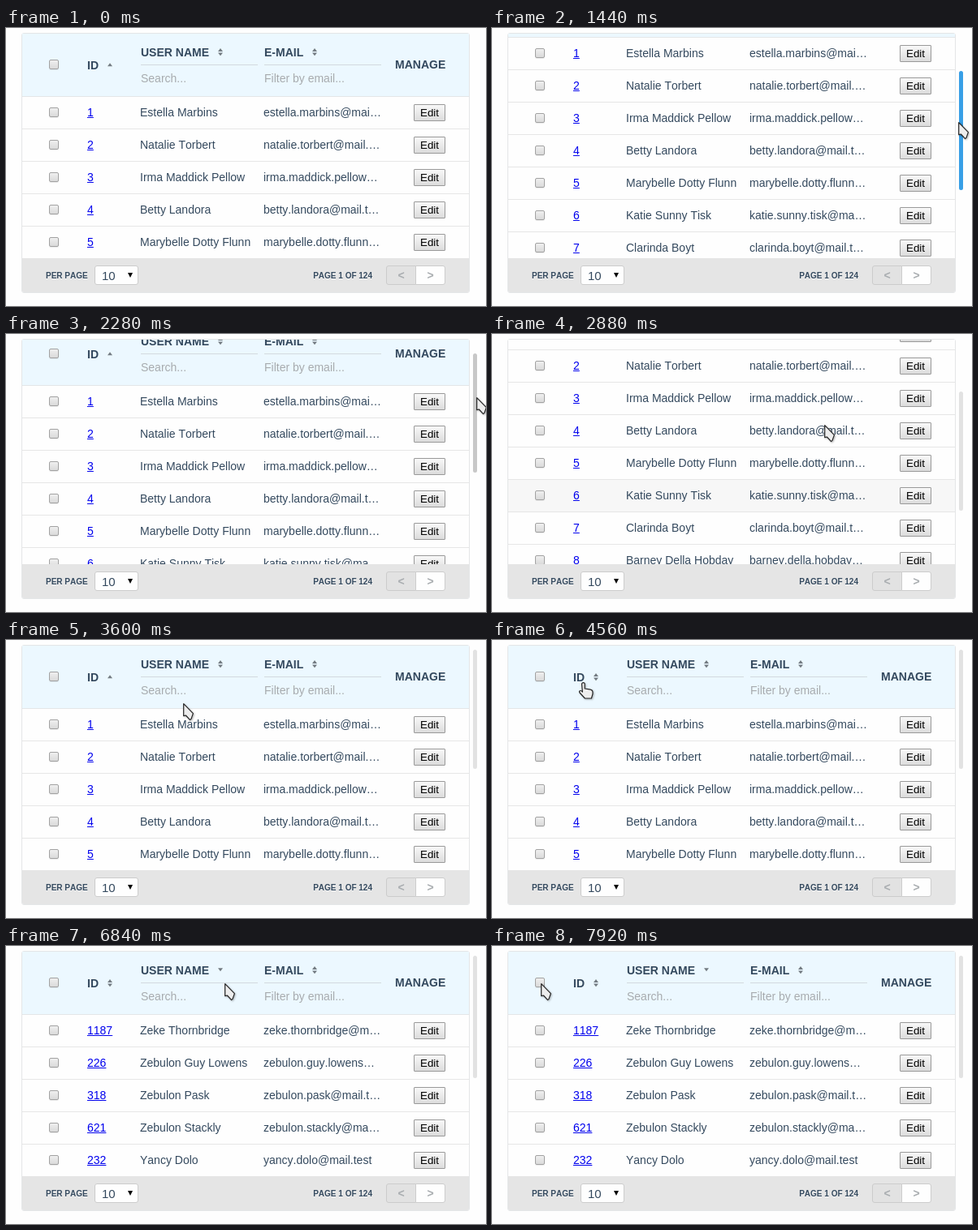
These frames come from a looping animation (591x343 px, 8000 ms). An HTML page:

```html
<!DOCTYPE html>
<html lang="en">
<head>
<meta charset="utf-8">
<title>User table</title>
<style>
  html, body { margin: 0; width: 100%; height: 100%; overflow: hidden; }
  body { position: relative; background: #fefefe; color: #34495e; white-space: nowrap;
    font: 14px/16px "Liberation Sans", Arial, sans-serif; font-kerning: none; }
  body * { position: absolute; box-sizing: border-box; }
  .frame { left: 19px; top: 6px; width: 552px; height: 321px; border: 1px solid #e4e6e7; border-radius: 3px; }
  .view { left: 20px; top: 7px; width: 550px; height: 277px; overflow: hidden; background: #fefefe; }
  .sheet { left: -20px; top: -7px; width: 591px; height: 485px; }
  .head { left: 20px; top: 7px; width: 550px; height: 78px; background: #ecf8ff; border-bottom: 1px solid #e3e6e8; }
  .line { top: 45px; width: 144px; height: 1px; background: #d3dade; }
  .hint { top: 54px; color: #a7abae; }
  .check { left: 53px; width: 12px; height: 12px; border: 1px solid #a2a2a2; border-radius: 2px;
    background: linear-gradient(#efefef, #dadada); box-shadow: 0 1px 1px rgba(0,0,0,.08); }
  .row { left: 20px; width: 550px; height: 40px; line-height: 39px; border-bottom: 1px solid #e6e6e6; }
  .row.on { background: #f7f7f7; }
  .row .check { left: 33px; top: 13px; }
  .id { left: 80px; color: #00e; text-decoration: underline; }
  .name { left: 145px; }
  .mail { left: 297px; width: 145px; overflow: hidden; text-overflow: ellipsis; }
  .edit { left: 482px; top: 9px; width: 39px; height: 21px; border: 1px solid #999; border-radius: 1px;
    background: linear-gradient(#f8f8f8, #dcdcdc); color: #000; font-size: 13.33px; line-height: 19px; text-align: center; }
  .foot { left: 20px; top: 284px; width: 550px; height: 42px; background: #e5e5e5; border-radius: 0 0 2px 2px; }
  .small { top: 298px; font-size: 10px; text-shadow: 0 1px 0 #f8f8f8; }
  .box { top: 293px; height: 24px; border: 1px solid #ccc; background: #fefefe; line-height: 22px; }
  .select { left: 109px; width: 54px; border-radius: 3px; padding-left: 8px; font-size: 15px; line-height: 23px; }
  .page { width: 37px; color: #a9adb0; font-weight: bold; text-align: center; }
  svg { overflow: visible; }
  .sort { width: 6px; height: 9px; fill: #737b82; }
  .bar { left: 575px; width: 5px; border-radius: 2.5px; }
  .cursor { left: 0; top: 0; width: 20px; height: 24px; filter: drop-shadow(1px 1px 1px rgba(0,0,0,.3)); }
  .cursor path { fill: #ededed; stroke: #222; stroke-width: 1.2; stroke-linejoin: round; }
</style>
</head>
<body>
<div class="frame"></div>
<div class="view"><div class="sheet" id="sheet">
  <div class="head"></div>
  <i class="check" style="top:39px"></i>
  <b style="left:100px;top:38px">ID</b>
  <svg class="sort" style="left:125px;top:41px"><path id="sortId"/></svg>
  <b style="left:166px;top:22px">USER NAME</b>
  <svg class="sort" style="left:261px;top:25px"><path id="sortName"/></svg>
  <b style="left:318px;top:22px">E-MAIL</b>
  <svg class="sort" style="left:377px;top:25px"><path id="sortMail"/></svg>
  <b style="left:479px;top:37px">MANAGE</b>
  <i class="line" style="left:166px"></i><i class="line" style="left:318px"></i>
  <span class="hint" style="left:166px">Search...</span>
  <span class="hint" style="left:318px">Filter by email...</span>
</div></div>
<div class="foot"></div>
<b class="small" style="left:49px">PER PAGE</b>
<div class="box select">10</div>
<svg style="left:150px;top:302px" width="6" height="6"><path d="M0 0h6L3 6z"/></svg>
<b class="small" style="right:140px">PAGE 1 OF 124</b>
<div class="box page" style="left:468px;background:#e2e2e2;border-radius:3px 0 0 3px">&lt;</div>
<div class="box page" style="left:504px;border-radius:0 3px 3px 0">&gt;</div>
<div class="bar" id="bar"></div>
<svg class="cursor" id="cursor"><path id="shape"/></svg>
<script>
  const LOOP = 8000, STEP = 120, RATIO = 1.78, ROW = 40, TOP = 85;
  const SHOW = 240, GRAB = 1080, DRAG = 1440, DROP = 2280;
  const $ = id => document.getElementById(id);

  const users = [
    [1, "Estella Marbins"], [2, "Natalie Torbert"], [3, "Irma Maddick Pellow"], [4, "Betty Landora"],
    [5, "Marybelle Dotty Flunn"], [6, "Katie Sunny Tisk"], [7, "Clarinda Boyt"],
    [8, "Barney Della Hobday"], [9, "Muriel Stanby"], [10, "Lorna Petwick"]
  ];
  const byId = [[1234, "Lorraine Vey"], [1233, "Philomena Dawley"], [1232, "Florinda Cobhan"],
    [1231, "Piper Grace Holt"], [1230, "Rinaldo Ivo Tasker"]];
  const byName = [[1187, "Zeke Thornbridge"], [226, "Zebulon Guy Lowens"], [318, "Zebulon Pask"],
    [621, "Zebulon Stackly"], [232, "Yancy Dolo"]];

  const both = "M0 4L3 0 6 4zM0 5.5h6L3 9.3z", asc = "M0 6.3L3 2.3 6 6.3z", desc = "M0 2.3h6L3 6.3z";
  const arrow = "M.7.7V15.6L3.4 15 8.6 20.6 10 19.4 12.4 12.6z";
  const hand = "M3.6 2.6Q3.6.7 5.4.7T7.2 2.6V8l5.6.8q4.2.6 4.2 3.4v2.4L15.4 20H7.4L1 13Q-.1 11.4 1.3 10.7T4.4 12z";

  const states = [
    { from: 0, list: users, id: asc, name: both },
    { from: 4560, list: users, id: both, name: both },
    { from: 5280, list: byId, id: desc, name: both },
    { from: 6240, list: byName, id: both, name: desc }
  ];

  // Key points: time, then values
  const scroll = [[1320, 0], [1440, 73], [1680, 201], [2280, 21], [2400, 21], [2640, 201], [2760, 201],
    [2880, 105], [3000, 0]];
  const path = [[240, 470, 178], [960, 559, 92], [1080, 574, 75], [1440, 574, 75], [2280, 579, 78],
    [2880, 409, 112], [3840, 154, 66], [4320, 107, 52], [5160, 107, 52], [5880, 217, 30], [6360, 217, 30],
    [6720, 340, 46], [7200, 54, 47], [7440, 128, 49], [7920, 60, 46]];

  function mix(keys, t, i = 1) {
    const n = keys.findIndex(k => k[0] > t);
    if (n < 0) return keys[keys.length - 1][i];
    if (!n) return keys[0][i];
    const a = keys[n - 1], b = keys[n];
    return a[i] + (b[i] - a[i]) * (t - a[0]) / (b[0] - a[0]);
  }

  const offset = t => Math.round(mix(scroll, t));

  function mouse(t) {
    const dragging = t >= DRAG && t < DROP;
    return {
      x: Math.round(mix(path, t)),
      y: Math.round(dragging ? 75 + offset(t) / RATIO : mix(path, t, 2))
    };
  }

  function rowUnder(t) {
    const { x, y } = mouse(t);
    return t < SHOW || x > 570 ? -1 : Math.floor((y + offset(t) - TOP) / ROW);
  }

  const inside = (p, x, y, w) => p.x >= x && p.x <= x + w && p.y >= y && p.y <= y + 16;
  const onLabel = p => inside(p, 100, 38, 14) || inside(p, 166, 22, 84);

  const rows = users.map((_, i) => {
    const row = document.createElement("div");
    row.className = "row";
    row.style.top = TOP + i * ROW + "px";
    row.innerHTML = '<i class="check"></i><span class="id"></span><span class="name"></span>' +
      '<span class="mail"></span><span class="edit">Edit</span>';
    $("sheet").append(row);
    return row;
  });

  let shown;
  function fill(list) {
    if (list === shown) return;
    shown = list;
    rows.forEach((row, i) => {
      row.hidden = i >= list.length;
      if (row.hidden) return;
      const [id, name] = list[i];
      row.querySelector(".id").textContent = id;
      row.querySelector(".name").textContent = name;
      row.querySelector(".mail").textContent = name.toLowerCase().replace(/ /g, ".") + "@mail.test";
    });
  }

  function draw(now) {
    const t = Math.floor((now % LOOP) / STEP) * STEP;
    const s = offset(t), p = mouse(t);
    const state = states.filter(k => k.from <= t).pop();
    const live = t >= SHOW ? "visible" : "hidden";

    fill(state.list);
    $("sheet").style.transform = `translateY(${-s}px)`;
    $("sortId").setAttribute("d", state.id);
    $("sortName").setAttribute("d", state.name);
    $("sortMail").setAttribute("d", both);

    // The highlight trails the pointer by one step
    const over = rowUnder(t - STEP);
    rows.forEach((row, i) => row.classList.toggle("on", i === over));

    const bar = $("bar").style;
    bar.visibility = live;
    bar.top = Math.round(12 + s / RATIO) + "px";
    bar.height = (state.list === byName ? 151 : 147) + "px";
    bar.background = t >= GRAB && t < DROP ? "#389fe6" : p.x > 570 ? "#c8c8c8" : "#e2e2e2";

    $("cursor").style.visibility = live;
    $("cursor").style.transform = `translate(${p.x}px, ${p.y}px)`;
    $("shape").setAttribute("d", onLabel(p) ? hand : arrow);
  }

  const start = performance.now();
  function tick() {
    draw(performance.now() - start);
    requestAnimationFrame(tick);
  }
  tick();
</script>
</body>
</html>
```
